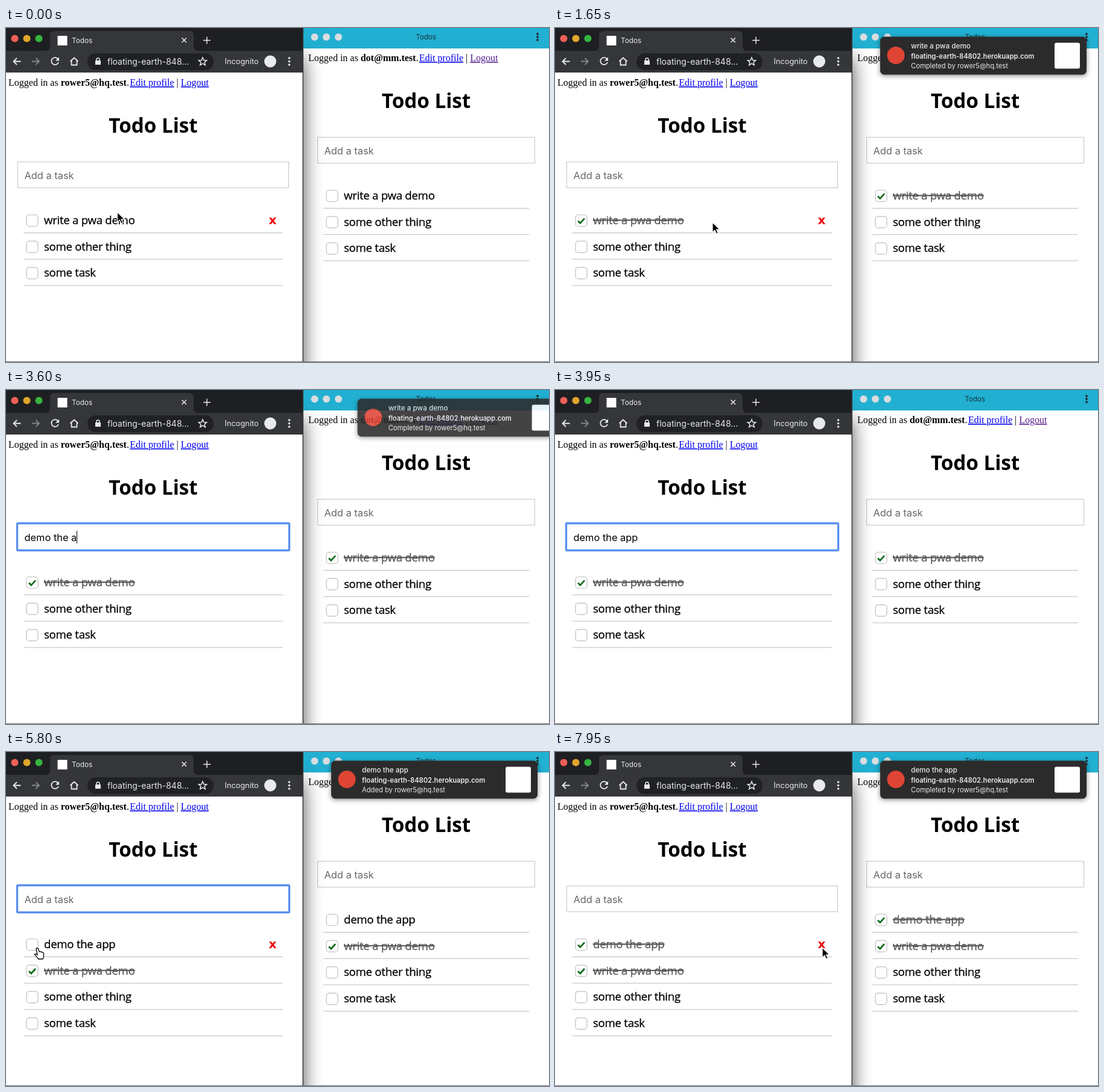
An HTML page for the animation above (8000 ms loop, 900 px wide and 555 px high).

```html
<!DOCTYPE html>
<html lang="en">
<head>
<meta charset="utf-8">
<title>Todos</title>
<style>
  html, body { margin: 0; width: 100%; height: 100%; overflow: hidden; background: #fff; }
  svg { display: block; width: 900px; height: 555px; overflow: hidden; }
  text { white-space: pre; }
  .ui { font-family: Inter, sans-serif; fill: #e8eaed; }
  .login { font: 16px "Liberation Serif", serif; }
  .login .mail { font-weight: 700; }
  .link { fill: #0000ee; text-decoration: underline; }
  .link.visited { fill: #551a8b; }
  .title { font: 700 33.2px "Open Sans", sans-serif; text-anchor: middle; }
  .input { font: 16.4px Inter, sans-serif; }
  .hint { fill: #666; }
  .field { fill: #fff; stroke: #c4c4c4; }
  .ring { fill: none; stroke: #5a90f0; stroke-width: 3.4; visibility: hidden; }
  .focus .ring { visibility: visible; }
  .label { font: 18.6px "Open Sans", sans-serif; letter-spacing: -.26px; stroke: #000; stroke-width: .3; }
  .box { fill: #fff; stroke: #bdbdbd; stroke-width: 1.2; }
  .tick { fill: none; stroke: #0d6b18; stroke-width: 2.7; visibility: hidden; }
  .done .tick { visibility: visible; }
  .done .label { fill: #585858; stroke: #585858; text-decoration: line-through; }
  .rule { stroke: #bcbcbc; }
  .remove { font: 700 20px "DejaVu Sans", sans-serif; fill: #f00505; visibility: hidden; }
  .hover .remove { visibility: visible; }
  .icon { fill: none; stroke: #e8eaed; stroke-width: 1.8; }
  .thin { stroke-width: 1.5; }
  .dim { stroke: #85878b; }
  .banner { animation: banner 8s infinite; }
  @keyframes banner {
    0%, 13% { transform: translateX(370px); animation-timing-function: ease-out; }
    18% { transform: none; }
    43.75% { transform: none; opacity: 1; animation-timing-function: cubic-bezier(.333, 0, .667, .333); }
    47.5% { transform: translateX(385px); opacity: 0; animation-timing-function: step-end; }
    51% { transform: translateX(370px); opacity: 1; animation-timing-function: ease-out; }
    55%, 100% { transform: none; opacity: 1; }
  }
</style>
</head>
<body>
<svg viewBox="0 0 900 555">
  <defs>
    <filter id="blur" x="-20%" y="-20%" width="140%" height="140%"><feGaussianBlur stdDeviation="17"/></filter>
    <filter id="soft" x="-10%" y="-40%" width="120%" height="190%"><feGaussianBlur stdDeviation="4"/></filter>
  </defs>
  <rect width="900" height="555" fill="#fff"/>

  <g id="right" transform="translate(497 -41)"></g>
  <rect x="492" width="408" height="34" fill="#22b0d2"/>
  <g fill="#d9dddf"><circle cx="511.5" cy="15" r="6"/><circle cx="531" cy="15" r="6"/><circle cx="551" cy="15" r="6"/></g>
  <text class="ui" x="696" y="19" font-size="11.6" text-anchor="middle" style="fill:#16323a">Todos</text>
  <g fill="#1f2b2f"><circle cx="881" cy="10" r="1.9"/><circle cx="881" cy="15" r="1.9"/><circle cx="881" cy="20" r="1.9"/></g>

  <rect x="-60" y="50" width="550" height="640" opacity=".82" filter="url(#blur)"/>

  <rect width="492" height="555" fill="#fff"/>
  <g id="left"></g>
  <rect width="492" height="74" fill="#35363a"/>
  <path d="M0 0H492V38H319Q311 38 311 30V13Q311 5 303 5H81Q73 5 73 13V30Q73 38 65 38H0Z" fill="#1e1f22"/>
  <circle cx="14.5" cy="17.5" r="6" fill="#ee5f56"/>
  <circle cx="34.5" cy="17.5" r="6" fill="#e0a52c"/>
  <circle cx="54.5" cy="17.5" r="6" fill="#35b53f"/>
  <path d="M73 38V13Q73 5 81 5H303Q311 5 311 13V38Z" fill="#35363a"/>
  <rect x="85.5" y="13" width="16" height="16" fill="#fff"/>
  <text class="ui" x="109" y="25" font-size="11.8">Todos</text>
  <path class="icon thin" d="M291.5 16.5l7.5 7.5m0-7.5l-7.5 7.5M327 20.5h12m-6-6v12"/>
  <rect x="135" y="42" width="209" height="28" rx="14" fill="#202124"/>
  <path class="icon" d="M24.5 55.5H12.500m5.500-5.500l-5.500 5.500 5.500 5.500M86.500 52a6 6 0 1 0 .5 5"/>
  <path d="M88 48.500v6h-6z" fill="#e8eaed"/>
  <path class="icon dim" d="M43 55.5H55m-5.5-5.500l5.500 5.500-5.500 5.500"/>
  <path class="icon" d="M106.5 55.5l6.500-6 6.500 6M108.500 54.500v7h9v-7"/>
  <path d="M148 54h9v7h-9z" fill="#e8eaed"/>
  <path class="icon thin" d="M150 54v-1.500a2.500 2.500 0 0 1 5 0V54"/>
  <text class="ui" x="168" y="60.5" font-size="14">floating-earth-848...</text>
  <path class="icon thin" d="M326 49l1.900 4.500 4.800.4-3.700 3.100 1.200 4.700-4.200-2.500-4.200 2.500 1.200-4.700-3.700-3.100 4.800-.4z"/>
  <text class="ui" x="362.5" y="60" font-size="12.8">Incognito</text>
  <circle cx="438" cy="55.5" r="10" fill="#e8eaed"/>
  <g fill="#e8eaed"><circle cx="469.5" cy="50" r="1.8"/><circle cx="469.5" cy="55.5" r="1.8"/><circle cx="469.5" cy="61" r="1.8"/></g>
  <rect x="491.5" width="1.5" height="555" fill="#3a3a3a"/>
  <rect y="554" width="900" height="1" fill="#6a6a6a"/>

  <g class="banner">
    <rect x="539" y="17" width="342" height="62" rx="6" opacity=".5" filter="url(#soft)"/>
    <rect x="539" y="14.500" width="342" height="63" rx="6.500" fill="#2c2b2b"/>
    <circle cx="565" cy="45.5" r="14.5" fill="#e04435"/>
    <text class="ui" id="head" x="590" y="34" font-size="11.7" font-weight="500"></text>
    <text class="ui" x="590" y="50.5" font-size="11.15" font-weight="600">floating-earth-84802.herokuapp.com</text>
    <text class="ui" id="note" x="590" y="66.5" font-size="11.2"></text>
    <rect x="828" y="24.5" width="42" height="43" rx="3" fill="#fff"/>
  </g>

  <g id="cursor">
    <path id="arrow" d="M0 0V16.500L3.900 12.900 6.600 19 9.300 17.800 6.700 11.900H12Z" fill="#000" stroke="#fff" stroke-width="1.2"/>
    <path id="beam" d="M-3-10Q0-10 0-8Q0-10 3-10M0-8V8M-3 10Q0 10 0 8Q0 10 3 10M-2 1H2" fill="none" stroke="#000" stroke-width="1.3"/>
    <path id="hand" d="M-2 0Q0-2.500 1.500 0L3 5Q5 3.500 6 5.500Q8 4.500 8.700 6.500Q10.500 6 10.500 8.500V12Q10.500 14 9 17H1.500Q0 13.500-3.500 11Q-5.500 8.500-3 8.500L0 10Z" fill="#fff" stroke="#000" stroke-width="1.3"/>
  </g>
</svg>
<script>
  const LOOP = 8000, PITCH = 43.7;
  const $ = id => document.getElementById(id);
  const NEW = 'demo the app', FIRST = 'write a pwa demo';
  const TASKS = [NEW, FIRST, 'some other thing', 'some task'];
  const USER = 'rower5@hq.test';

  // Moments when each key lands in the field
  const KEYS = [2900, 3000, 3150, 3300, 3350, 3400, 3450, 3500, 3550, 3600, 3700, 3800];
  const SUBMIT = 4000, FOCUS = 2550, BLUR = 5950;

  // Pointer stops: time, x, y
  const PATH = [
    [50, 184.5, 306], [250, 118, 335], [450, 52, 327], [1000, 52, 327],
    [1650, 261, 323], [2050, 261, 323], [2300, 180, 252], [5050, 180, 252],
    [5350, 118, 322], [5650, 52, 327], [5950, 52, 327], [6400, 190, 407],
    [6550, 190, 407], [6800, 250, 391], [6950, 250, 391], [7650, 442, 323],
    [7900, 442, 323], [7950, 443, 325]
  ];

  const row = (name, w) => `<g>
    <rect class="box" x="34" y="310.5" width="19" height="19" rx="4.5"/>
    <path class="tick" d="M38 320.5l3.800 3.800 7.200-8"/>
    <text class="label" x="63" y="326">${name}</text>
    <text class="remove" x="435.5" y="326">x</text>
    <path class="rule" d="M29 340.5H${w - 29}"/></g>`;

  function pane(id, { w, mail, linkX, seen = '', times }) {
    const root = $(id);
    root.innerHTML = `
      <text class="login" x="4" y="96">Logged in as <tspan class="mail">${mail}</tspan>.</text>
      <text class="login" x="${linkX}" y="96"><tspan class="link">Edit profile</tspan> | <tspan
        class="link ${seen}">Logout</tspan></text>
      <text class="title" x="${w / 2}" y="174">Todo List</text>
      <rect class="field" x="19.5" y="222.5" width="${w - 39}" height="43"/>
      <rect class="ring" x="18.5" y="221.5" width="${w - 37}" height="45" rx="1.5"/>
      <text class="input hint" x="30.5" y="251">Add a task</text>
      <g class="rows">${TASKS.map(name => row(name, w)).join('')}</g>`;
    return { root, times, input: root.querySelector('.input'), rows: [...root.querySelector('.rows').children] };
  }

  const right = pane('right', {
    w: 399, mail: 'dot@mm.test', linkX: 187.7, seen: 'visited',
    times: { first: 600, add: 4150, second: 6150 }
  });
  const left = pane('left', {
    w: 488, mail: USER, linkX: 205.3,
    times: { first: 500, add: SUBMIT, second: BLUR }
  });
  left.root.insertAdjacentHTML('beforeend', '<path id="caret" stroke="#000" d="M0 234V255"/>');

  function pointer(t) {
    const i = PATH.findIndex(p => p[0] > t);
    if (i < 0) return PATH[PATH.length - 1].slice(1);
    if (!i) return PATH[0].slice(1);
    const [t0, x0, y0] = PATH[i - 1], [t1, x1, y1] = PATH[i];
    const p = (t - t0) / (t1 - t0), e = p * p * (3 - 2 * p);
    return [x0 + (x1 - x0) * e, y0 + (y1 - y0) * e];
  }

  function drawList({ rows, times }, t, hovered) {
    const added = t >= times.add;
    rows.forEach((el, i) => {
      const place = added ? i : i - 1;
      el.setAttribute('transform', `translate(0 ${place * PITCH})`);
      el.style.display = place < 0 ? 'none' : '';
      el.classList.toggle('done', i === 0 && t >= times.second || i === 1 && t >= times.first);
      el.classList.toggle('hover', place === hovered);
    });
  }

  function drawField(t) {
    const typed = t < SUBMIT ? NEW.slice(0, KEYS.filter(k => k <= t).length) : '';
    const focus = t >= FOCUS && t < BLUR;
    const lit = t >= KEYS[0] && t < 3800 || (t + 700) % 1000 < 500;
    left.input.textContent = typed || 'Add a task';
    left.input.classList.toggle('hint', !typed);
    left.root.classList.toggle('focus', focus);
    const end = typed ? left.input.getComputedTextLength() : 0;
    $('caret').setAttribute('transform', `translate(${Math.round(30.5 + end) + .5} 0)`);
    $('caret').style.display = focus && lit ? '' : 'none';
  }

  function drawPointer(t, x, y, over) {
    const shape = y > 222 && y < 266 ? 'beam' : over >= 0 && x < 56 ? 'hand' : 'arrow';
    for (const id of ['arrow', 'beam', 'hand']) $(id).style.display = id === shape ? '' : 'none';
    $('cursor').setAttribute('transform', `translate(${x} ${y})`);
    $('cursor').style.display = t >= KEYS[0] && t < 5050 ? 'none' : '';
  }

  function draw(t) {
    const [x, y] = pointer(t);
    const over = y > 297 ? Math.floor((y - 297) / PITCH) : -1;
    drawList(left, t, over);
    drawList(right, t, -1);
    drawField(t);
    drawPointer(t, x, y, over);
    $('head').textContent = t < 3900 ? FIRST : NEW;
    $('note').textContent = `${t < 3900 || t >= 6300 ? 'Completed' : 'Added'} by ${USER}`;
  }

  let start;
  function tick(now) {
    start ??= now;
    draw((now - start) % LOOP);
    requestAnimationFrame(tick);
  }
  draw(0);
  requestAnimationFrame(tick);
</script>
</body>
</html>
```
